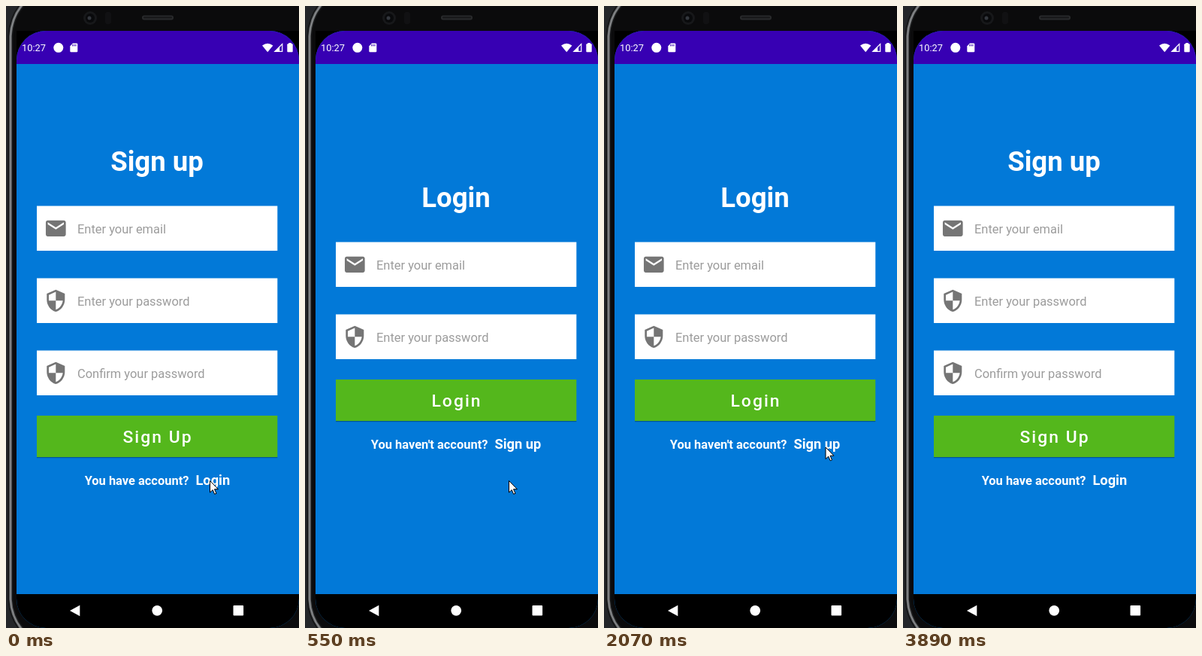
Animation of 390 by 826 pixels, one loop 4.43 s. Source, as an HTML page with a canvas:

```html
<!DOCTYPE html>
<html lang="en">
<head>
<meta charset="utf-8">
<title>Sign up and login</title>
<style>
html, body { margin: 0; width: 100%; height: 100%; overflow: hidden; background: #0b0b0c; }
canvas { display: block; width: 390px; height: 826px; }
</style>
</head>
<body>
<canvas id="stage"></canvas>
<script>
const W = 390, H = 826, LOOP = 4430;
const BLUE = '#0279d8', PURPLE = '#3700b3', GREEN = '#54b71c', GREY = '#757575';
const SCREEN = { x: 14, y: 33, w: 376, h: 793, r: 39 };
const MID = { x: 201.3, y: 429 };
const FONT = 'Roboto, "Noto Sans", sans-serif';

const canvas = document.getElementById('stage');
const ratio = window.devicePixelRatio || 1;
canvas.width = W * ratio;
canvas.height = H * ratio;
const ctx = canvas.getContext('2d');

const mail = new Path2D('M20 4H4c-1.1 0-2 .9-2 2v12c0 1.1.9 2 2 2h16c1.1 0 2-.9 2-2V6c0-1.1-.9-2-2-2zm0 4l-8 5-8-5V6l8 5 8-5v2z');
const shield = new Path2D('M12 1L3 5v6c0 5.55 3.84 10.74 9 12 5.16-1.26 9-6.45 9-12V5l-9-4zm0 10.99h7c-.53 4.12-3.28 7.79-7 8.94V12H5V6.3l7-3.11v8.8z');
const arrow = new Path2D('M.5 .5V16L4.2 12.6 6.7 18.3 9 17.3 6.5 11.7H11.4Z');
const rim = new Path2D('M23 -3C13 8 7 22 6 40V788C7 806 13 819 23 830');
const body = new Path2D('M23 -3C13 8 7 22 6 40V788C7 806 13 819 23 830H400V-3Z');

const pages = {
  signup: {
    title: 'Sign up', titleY: 219, top: 265.5, button: 'Sign Up',
    fields: ['Enter your email', 'Enter your password', 'Confirm your password'],
    ask: 'You have account?', link: 'Login'
  },
  login: {
    title: 'Login', titleY: 267, top: 313.5, button: 'Login',
    fields: ['Enter your email', 'Enter your password'],
    ask: "You haven't account?", link: 'Sign up'
  }
};

// Page switches: start time, leaving page, entering page, settle and end ages
const switches = [[280, 'signup', 'login', 150, 270], [3240, 'login', 'signup', 120, 260]];

// Pointer stops: time, x, y
const stops = [
  [0, 271, 630], [1800, 280, 614], [1950, 288, 599], [2070, 294.5, 585.5],
  [3500, 292, 612], [3620, 283, 700], [3740, 274, 780], [3890, -50, 0]
];

function rect(x, y, w, h, color) {
  ctx.fillStyle = color;
  ctx.fillRect(x, y, w, h);
}

function disc(x, y, r, color) {
  ctx.fillStyle = color;
  ctx.beginPath();
  ctx.arc(x, y, r, 0, Math.PI * 2);
  ctx.fill();
}

function pill(x, y, w, h, r, color) {
  ctx.fillStyle = color;
  ctx.beginPath();
  ctx.roundRect(x, y, w, h, r);
  ctx.fill();
}

function shape(d, color) {
  ctx.fillStyle = color;
  ctx.fill(new Path2D(d));
}

function line(path, width, color) {
  ctx.lineWidth = width;
  ctx.strokeStyle = color;
  ctx.stroke(path);
}

function text(str, x, y, size, weight, color = '#fff', align = 'left', gap = 0) {
  ctx.font = `${weight} ${size}px ${FONT}`;
  ctx.letterSpacing = gap + 'px';
  ctx.textAlign = align;
  ctx.fillStyle = color;
  ctx.fillText(str, x, y);
  ctx.letterSpacing = '0px';
}

function icon(path, x, y) {
  ctx.save();
  ctx.translate(x, y);
  ctx.scale(4 / 3, 4 / 3);
  ctx.fillStyle = GREY;
  ctx.fill(path);
  ctx.restore();
}

function page(name, zoom = 1) {
  const p = pages[name];
  ctx.save();
  ctx.translate(MID.x, MID.y);
  ctx.scale(zoom, zoom);
  ctx.translate(-MID.x, -MID.y);
  rect(SCREEN.x, SCREEN.y, SCREEN.w, SCREEN.h, BLUE);
  rect(SCREEN.x, SCREEN.y, SCREEN.w, 44, PURPLE);
  rect(SCREEN.x, 781, SCREEN.w, 60, '#000');
  text(p.title, 201, p.titleY, 36.57, 700, '#fff', 'center');

  p.fields.forEach((hint, i) => {
    const y = p.top + i * 96;
    rect(41, y, 320.3, 59.5, '#fff');
    icon(i ? shield : mail, 50.3, y + 13.8);
    text(hint, 95, y + 36.2, 16.46, 400, '#9c9c9c');
  });

  const y = p.top + p.fields.length * 96 - 9.5;
  rect(41, y + 55, 320.3, 1.2, 'rgba(0,0,0,.3)');
  rect(41, y, 320.3, 55, GREEN);
  text(p.button, 202, y + 36.2, 22.86, 500, '#fff', 'center', 2.04);
  text(p.ask, 243.4, y + 92, 16.46, 700, '#fff', 'right');
  text(p.link, 252.4, y + 92, 18.29, 700);
  ctx.restore();
}

function phone() {
  rect(0, 0, W, H, '#242629');
  ctx.fillStyle = '#0b0b0c';
  ctx.fill(body);
  line(rim, 7, '#141516');
  line(rim, 3.6, '#5f6163');
  line(rim, 1.4, '#8b8d8f');
  disc(112, 16, 9, '#17181a');
  disc(112, 16, 6, '#090a0c');
  disc(111, 16, 2.5, '#34383e');
  pill(132, 8, 8, 16, 3, '#111113');
  pill(181, 12.5, 42, 6, 3, '#292a2c');
  pill(183, 14, 38, 2.5, 1, '#19191b');
  rect(SCREEN.x, SCREEN.y, SCREEN.w, 60, '#000');
}

function statusBar() {
  text('10:27', 21, 60, 12.8, 400);
  disc(69.8, 55.3, 6.5, '#fff');
  shape('M89 49.5H94Q95.3 49.5 95.3 50.8V60Q95.3 61.2 94 61.2H86.5Q85.3 61.2 85.3 60V53.2Z', '#fff');
  for (let i = 0; i < 3; i++) rect(88.2 + i * 2.1, 51, 1, 2.4, PURPLE);
  shape('M341 52.6Q348.2 47 355.4 52.6L348.2 61.2Z', '#fff');
  shape('M368.3 49V61H356.3Z', '#fff');
  shape('M367.1 52V59.8H364.2V54.9Z', PURPLE);
  pill(374.3, 50.2, 7.4, 11, 1, '#fff');
  rect(376.2, 49, 3.6, 2, '#fff');
}

function navBar() {
  shape('M85 803L98.3 795.8V810.2Z', '#fff');
  disc(201.2, 802.8, 6.9, '#fff');
  pill(302.5, 796, 13.6, 13.6, 1, '#fff');
}

function pointer(t) {
  const [, x, y] = stops.filter(s => s[0] <= t).pop();
  ctx.save();
  ctx.translate(x, y);
  ctx.fillStyle = '#fff';
  ctx.fill(arrow);
  line(arrow, 1, '#000');
  ctx.restore();
}

function pagesAt(t) {
  const last = switches.filter(s => s[0] <= t).pop();
  if (!last) return page('signup');
  const [start, from, to, settle, end] = last;
  const age = t - start;
  if (age >= end) return page(to);
  page(from, 1.048);
  rect(SCREEN.x, SCREEN.y, SCREEN.w, SCREEN.h, 'rgba(0,0,0,.3)');
  page(to, age < settle ? 0.988 : 0.997);
}

function draw(t) {
  ctx.setTransform(ratio, 0, 0, ratio, 0, 0);
  phone();
  ctx.save();
  ctx.beginPath();
  ctx.roundRect(SCREEN.x, SCREEN.y, SCREEN.w, SCREEN.h, SCREEN.r);
  ctx.clip();
  pagesAt(t);
  ctx.restore();
  statusBar();
  navBar();
  pointer(t);
}

const began = performance.now();
function tick() {
  draw((performance.now() - began) % LOOP);
  requestAnimationFrame(tick);
}
tick();
</script>
</body>
</html>
```
